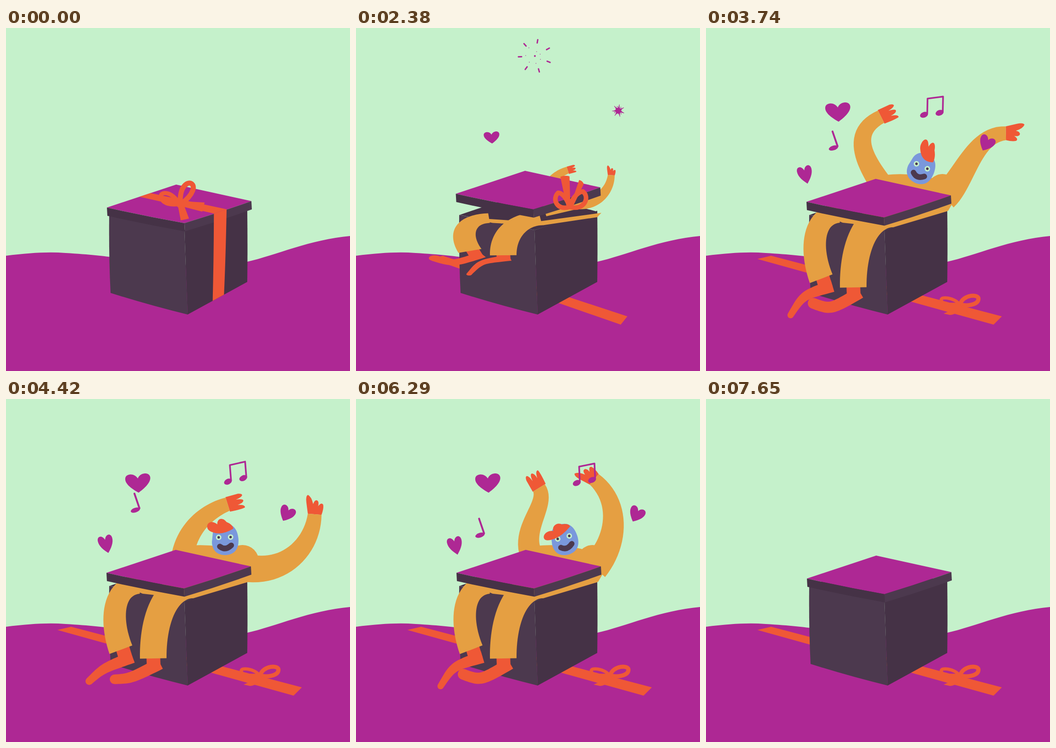
These frames come from a looping animation (750 px wide and 747 px high, 8000 ms). An HTML page:

```html
<!DOCTYPE html>
<html lang="en">
<head>
<meta charset="utf-8">
<title>Gift box dance</title>
<style>
html, body { margin: 0; width: 100%; height: 100%; overflow: hidden; background: #c5f1cb; }
svg { display: block; width: 100%; height: 100%; }
</style>
</head>
<body>
<svg id="stage" viewBox="0 0 750 747" preserveAspectRatio="none"></svg>
<script>
const MINT = '#c5f1cb', PURPLE = '#ae2894', FRONT = '#4c394e', DARK = '#453246';
const ORANGE = '#ef5836', YELLOW = '#e59f42', BLUE = '#7a98dc';
const LOOP = 8000, HOLD = 680, STEP = 170, LAST = 42;
const POP = 8;      // step at which the lid jumps
const TAU = 2 * Math.PI;

const LEFT_HAND = 'M-16 0L-15 -28Q-13 -37 -9 -36Q-5 -33 -4 -20Q-2 -36 3 -35Q8 -33 8 -20Q12 -36 18 -34Q20 -28 17 0Z';
const RIGHT_HAND = 'M-15 0L-20 -24Q-23 -38 -18 -41Q-10 -38 -5 -22Q-2 -33 4 -30Q8 -27 6 -18Q13 -28 17 -22Q19 -14 15 0Z';
const HEART = 'M0 20C-12 12 -27 0 -26 -12C-25 -24 -6 -24 0 -11C6 -24 25 -24 26 -12C27 0 12 12 0 20Z';

const lerp = (a, b, t) => a + (b - a) * t;
const between = (a, b, t) => [lerp(a[0], b[0], t), lerp(a[1], b[1], t)];
const clamp = v => Math.max(0, Math.min(1, v));
const smooth = v => { const t = clamp(v); return t * t * (3 - 2 * t); };
const beat = n => 0.62 + 0.68 * Math.cos(TAU * (n - 1.3) / 5);
const fade = n => clamp((40 - n) / 5);

const fill = (d, c) => `<path d="${d}" fill="${c}"/>`;
const line = (d, c, w, cap = 'round') => `<path d="${d}" fill="none" stroke="${c}" stroke-width="${w}" stroke-linecap="${cap}" stroke-linejoin="round"/>`;
const dot = (x, y, r, c) => `<circle cx="${x}" cy="${y}" r="${r}" fill="${c}"/>`;
const oval = (x, y, rx, ry, rot, c) => `<ellipse rx="${rx}" ry="${ry}" transform="translate(${x} ${y}) rotate(${rot})" fill="${c}"/>`;
const poly = (points, c) => fill(`M${points.join('L')}Z`, c);
const group = (s, x, y, rot = 0, sx = 1, sy = sx) =>
  `<g transform="translate(${x} ${y}) rotate(${rot}) scale(${sx} ${sy})">${s}</g>`;
const scaleAbout = (s, x, y, sx, sy) => group(group(s, -x, -y), x, y, 0, sx, sy);

// Edge from a to b that sags in the middle.
function edge(a, b, sag) {
  const [x, y] = between(a, b, 0.5);
  return `Q${x} ${y + sag} ${b}`;
}

// Tapered limb along a cubic curve through four points.
function limb([a, b, c, d], w0, w1, colour) {
  const one = [], two = [];
  for (let i = 0; i <= 24; i++) {
    const t = i / 24, u = 1 - t;
    const pos = k => u*u*u*a[k] + 3*u*u*t*b[k] + 3*u*t*t*c[k] + t*t*t*d[k];
    const vel = k => u*u*(b[k] - a[k]) + 2*u*t*(c[k] - b[k]) + t*t*(d[k] - c[k]);
    const dx = vel(0), dy = vel(1), h = lerp(w0, w1, t) / 2 / Math.hypot(dx, dy);
    one.push([pos(0) - dy * h, pos(1) + dx * h]);
    two.unshift([pos(0) + dy * h, pos(1) - dx * h]);
  }
  return poly(one.concat(two), colour);
}

// Arm swung from the shoulder; the bends push its curve sideways.
function arm(shoulder, angle, length, low, lowBend, high, highBend, width, hand) {
  const a = angle * Math.PI / 180, sin = Math.sin(a), cos = Math.cos(a);
  const place = (along, side) => [shoulder[0] + sin * along + cos * side, shoulder[1] - cos * along + sin * side];
  const wrist = place(length, 0);
  const turn = angle - Math.atan2(highBend, length - high) * 180 / Math.PI;
  return group(fill(hand, ORANGE), ...wrist, turn)
    + limb([shoulder, place(low, lowBend), place(high, highBend), wrist], width, 30, YELLOW);
}

function head(x, y, tilt, hair) {
  const face = fill('M-27 -12C-25 -30 -12 -36 3 -35C20 -34 28 -20 29 -2C30 20 20 32 1 33C-18 33 -29 22 -29 4Z', BLUE)
    + [-14, 12].map(ex => dot(ex, -6, 6, MINT) + dot(ex, -6, 2.8, FRONT)).join('')
    + line('M-12 14Q0 24 13 12', FRONT, 12);
  const tuft = fill('M-24 -40C-26 -56 -12 -62 -4 -44C-1 -58 10 -58 14 -42Q24 -30 22 -20Q2 -14 -12 -24Q-22 -32 -24 -40Z', ORANGE);
  const tall = 1 + hair / 140;
  return group(face, x, y, tilt) + group(tuft, x, y, hair, 2 - tall, tall);
}

function torso(n, size) {
  const turn = TAU * n / 6;
  const wave = (mid, c, s) => mid + c * Math.cos(turn) + s * Math.sin(turn);
  const s = arm([385, 345], wave(2, 35, -24), 152, 56, -37, 118, wave(-23, -47, -29), 50, LEFT_HAND)
    + fill('M362 345L392 320Q452 313 515 333L549 362L528 398L390 430Z', YELLOW)
    + dot(516, 353, 35, YELLOW)
    + arm([520, 367], wave(22, 53, -5), 192, 55, wave(28, 13, -33), 142, wave(5, -3, -61), 62, RIGHT_HAND)
    + head(wave(462, 23, -5), 307, wave(5, 13, 15), wave(-10, 22, 24));
  return scaleAbout(s, 440, 390, size, size);
}

function foot(x, y, top, up) {
  const toe = [x - 78 - 10 * up, y + 62 - 37 * up], mid = [x - 50, y + 20 + 17 * up];
  return line(`M${x - top} ${y - 20}L${x} ${y + 6}`, ORANGE, 30, 'butt')
    + limb([[x + 14, y], mid, mid, toe], 26, 14 + 9 * up, ORANGE)
    + dot(...toe, 7 + 4.5 * up, ORANGE);
}

function legs(n, size) {
  const up = beat(n);
  const s = foot(322, 576, 1, 1 - up) + foot(262, 562, 8, up)
    + limb([[290, 403], [232, 408], [226, 480], [251 - 2 * up, 546]], 42, 53, YELLOW)
    + limb([[402, 404], [342, 412], [320, 490], [321, 565]], 60, 58, YELLOW)
    + fill('M240 400L298 424L325 427L408 434L526 399L535 380L389 420Z', YELLOW);
  return scaleAbout(s, 0, 425, 1, size);
}

// The box swells with k, from 0 (at rest) to 1.
function makeBox(k) {
  const left = [220 - 5 * k, 391 + 8 * k], back = [371, 341 + 9 * k];
  const right = [535 + 4 * k, 377 + 8 * k], front = [389, 425 + 7 * k];
  const foot = [396, 624], corner = [526 + 3 * k, 553 + 3 * k];
  const sag = 2 + 4 * k, drop = ([x, y]) => [x + 1, y + 18 - k];
  const lip = (a, b, c) => fill(`M${a}${edge(a, b, sag)}L${drop(b)}${edge(drop(b), drop(a), sag)}Z`, c);
  const rim = [389, 440 + 6 * k], outer = [526 + 4 * k, 398 + 9 * k];

  const walls = fill(`M${225 - 4 * k} ${407 + 7 * k}Q${224 - 12 * k} 500 ${228 - 5 * k} 577Q310 603 ${foot}L${rim}Z`, FRONT)
    + fill(`M${rim}L${outer}Q${527 + 11 * k} 480 ${corner}L${foot}Z`, DARK);
  const lid = fill(`M${left}L${back}L${right}${edge(right, front, sag)}${edge(front, left, sag)}Z`, PURPLE)
    + lip(left, front, DARK) + lip(front, right, FRONT);

  const near = between(front, right, 0.44), far = between(front, right, 0.63);
  const low = between(foot, corner, 0.42), high = between(foot, corner, 0.61);
  const bulge = 10 * k;
  const swing = line('M0 0C-2 -38 15 -47 22 -45C34 -41 30 -21 2 0', ORANGE, 11)
    + fill('M0 -6L53 -3L48 17L2 5Z', ORANGE);
  const bow = group(swing, 0, 0, -15 * k)
    + line('M-2 0C-20 -30 -45 -27 -42 -15C-39 1 -18 3 -2 0', ORANGE, 9)
    + group(fill('M-6 0L7 0L19 32L1 36Z', ORANGE), 0, 0, 0, 1, 1 - 0.4 * k)
    + dot(0, 0, 9, ORANGE);
  const wrapping = poly([between(left, back, 0.47), between(left, back, 0.63), far, near], ORANGE)
    + fill(`M${near}L${far}Q${479 + bulge} 500 ${high}L${low}Q${453 + bulge} 500 ${near}Z`, ORANGE)
    + group(bow, 380 + 5 * k, 383 + 5 * k);
  return { walls, lid, wrapping };
}

const looseRibbon = n =>
  scaleAbout(fill('M112 503L142 496L645 628L627 646Z', ORANGE), 378, 570, Math.min(1, 0.4 + (n - 9) * 0.2), 1);

// The bow tumbles to the ground, then lies flat.
function looseBow(n) {
  const p = (n - POP) / 6;
  if (p > 1) return line('M554 602C560 580 596 578 594 591C592 604 566 606 554 602', ORANGE, 9)
    + line('M552 602C545 588 510 583 513 593C516 606 540 600 552 602', ORANGE, 7)
    + fill('M545 601L560 604Q549 624 532 625L518 622Q537 615 545 601Z', ORANGE)
    + fill('M552 602L582 615L576 624Z', ORANGE);
  const s = line('M-2 0C-28 8 -40 -17 -26 -31C-16 -32 -3 -12 -2 0M0 0C32 8 44 -22 28 -34C14 -32 2 -14 0 0', ORANGE, 10)
    + fill('M-21 -66Q-11 -70 -1 -67L1 0L-7 0ZM20 -59Q28 -57 30 -50L6 0L0 0Z', ORANGE);
  return group(s, lerp(385, 548, p), lerp(388, 572, p) - 90 * Math.sin(Math.PI * p), 40 * Math.sin(TAU * p));
}

// Splat, then flying dashes, then dots.
function burst(x, y, age) {
  if (age < 0 || age > 4) return '';
  let s = dot(0, 0, age < 2 ? 13 : 2, PURPLE);
  for (let i = 0; i < 7; i++) {
    const r = 12 + 7 * age;
    const ray = age < 2 ? fill('M8 -7Q14 -1 27 -1L27 1Q14 1 8 7Z', PURPLE) + (i % 2 ? '' : dot(16, 8, 2, PURPLE))
      : age < 4 ? line(`M${r - 4} 0L${r + 3} 0`, PURPLE, 3) + dot(10 + i * 2, 2, 0.8, PURPLE)
      : dot(50, 0, 2, PURPLE) + (i % 2 ? dot(14 + i * 5, 3, 0.9, PURPLE) : '');
    s += group(ray, 0, 0, i * 360 / 7 - 80);
  }
  return group(s, x, y, 0, age ? 1 : 0.5);
}

// A heart grows while it flies from one point to another, then bobs on the beat.
function heart(n, birth, time, from, to, sx, sy, rot, bob, vanish) {
  const p = clamp((n - birth) / time);
  if (!p) return '';
  const [x, y] = between(from, to, smooth(p));
  const size = (vanish ? Math.sin(Math.PI * p) : p) * fade(n);
  const lift = p === 1 ? bob * beat(n) : 0;
  return group(fill(HEART, PURPLE), x + lift / 2, y - lift, rot, sx * size, sy * size);
}

const hearts = n =>
  heart(n, 2, 8, [330, 380], [122, 153], 0.67, 1.14, -13, 0, true)
  + heart(n, 6, 8, [313, 358], [288, 184], 1.05, 1, -4, 0)
  + heart(n, 13, 5, [250, 430], [217, 320], 0.62, 0.95, -14, 12)
  + heart(n, 13, 5, [520, 335], [611, 252], 0.66, 0.82, 27, 5);

function notes(n) {
  const turn = TAU * (n - 23) / 20, c = Math.cos(turn), s = Math.sin(turn);
  const size = clamp((n - 11) / 3) * fade(n);
  const single = oval(0, 0, 10.5, 5, -18, PURPLE) + line('M9 -4L-2 -36', PURPLE, 4);
  const pair = oval(0, 0, 9, 6, -18, PURPLE) + oval(34, -3, 9, 6, -18, PURPLE)
    + line('M7 -2L9 -35L43 -38L41 -5', PURPLE, 3.6);
  return group(single, 276 + 6 * c, 270 - 28 * c, 0, size)
    + group(pair, 484 + 9 * s, 180 - 9.5 * s, -8 - 6 * s, size);
}

function scene(n) {
  const open = n > POP;
  const box = makeBox(open ? 0 : 0.5 - 0.5 * Math.cos(n * 3 * Math.PI / 7));
  const size = smooth((n - 9) / 4) * smooth((41 - n) / 5);
  const lift = smooth((n - POP) / 2) * smooth((41 - n) / 2) + 2 * Math.sin(Math.PI * clamp((n - POP) / 4));
  return `<rect width="750" height="747" fill="${MINT}"/>`
    + fill('M0 496C50 490 90 487 130 490C200 494 240 500 300 508C380 518 460 525 526 509C585 496 665 460 750 453V747H0Z', PURPLE)
    + (open ? looseRibbon(n) + fill('M226 407L371 358L526 400L389 440Z', DARK) : '')
    + (size ? torso(n, size) : '') + box.walls + (size ? legs(n, size) : '')
    + group(box.lid, -lift, -12.4 * lift)
    + (open ? looseBow(n) : box.wrapping)
    + burst(261, 83, n - 3) + burst(572, 175, n - 6) + burst(390, 61, n - 8) + burst(572, 180, n - 11)
    + hearts(n) + notes(n);
}

const stage = document.getElementById('stage');
const start = performance.now();
let shown = -1;

function draw() {
  const t = (performance.now() - start) % LOOP;
  const n = t < HOLD ? 0 : Math.min(LAST, Math.floor((t - HOLD) / STEP) + 1);
  if (n !== shown) stage.innerHTML = scene(shown = n);
  requestAnimationFrame(draw);
}
draw();
</script>
</body>
</html>
```
